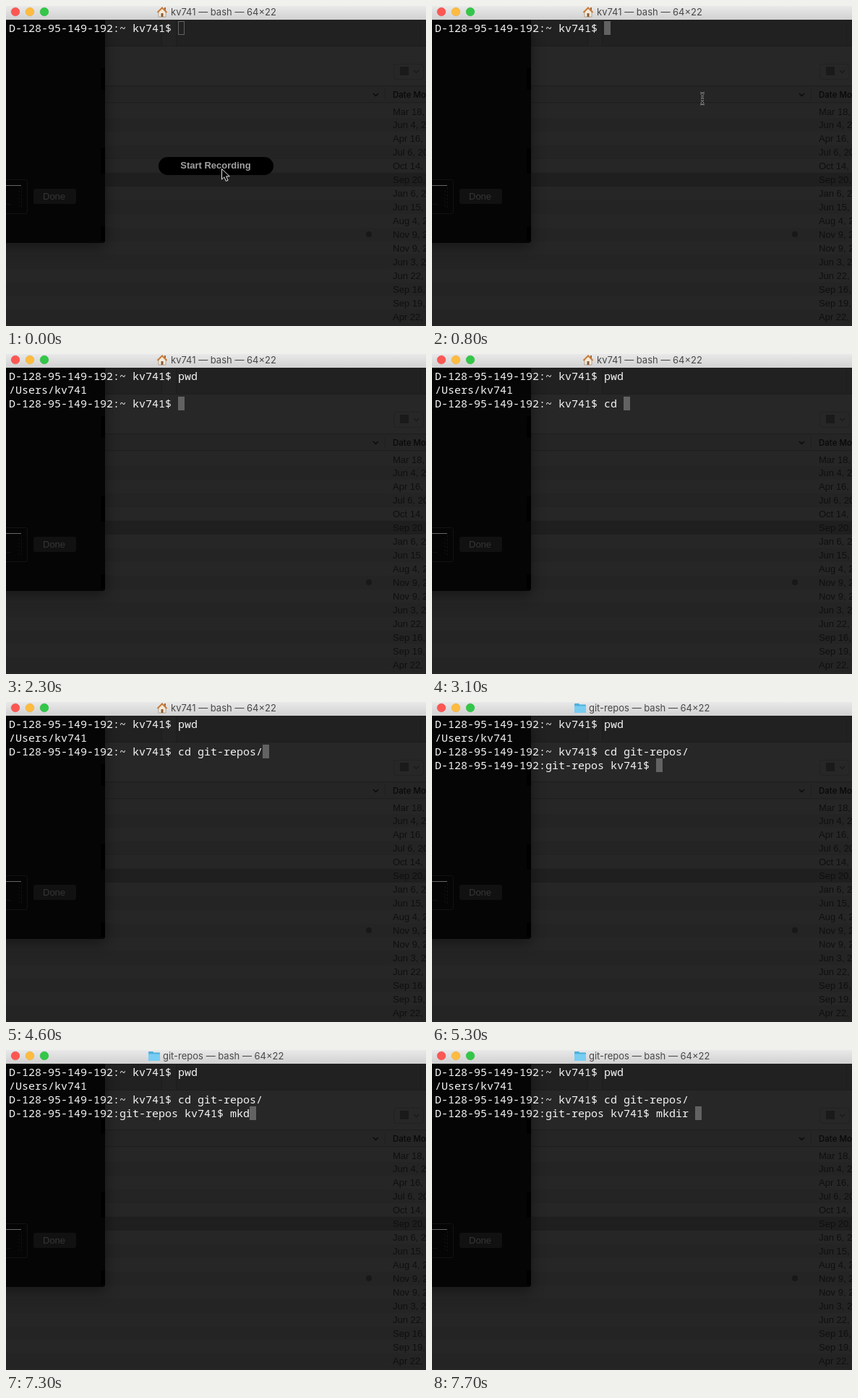
Recreate the animation shown at these times as an HTML page. Size 581 px wide and 443 px high, loop 8 s.

```html
<!DOCTYPE html>
<html lang="en">
<head>
<meta charset="utf-8">
<title>Terminal session</title>
<style>
html, body { margin: 0; width: 100%; height: 100%; overflow: hidden; background: #252525; }
#stage { position: absolute; left: 0; top: 0; width: 581px; height: 443px; overflow: hidden; }
svg { position: absolute; left: 0; top: 0; font-family: "Liberation Sans", sans-serif; }
.ui { font-family: Inter, sans-serif; }
#term {
  position: absolute; left: 4px; top: 21px; margin: 0;
  font: 300 15px/19px "Noto Sans Mono", monospace; color: #f4f4f4; white-space: pre;
}
#cursor { position: absolute; width: 9px; height: 19px; box-sizing: border-box; background: #626262; }
#cursor.hollow { background: none; border: 1px solid #626262; }
</style>
</head>
<body>
<div id="stage">
  <svg width="581" height="443">
    <defs>
      <linearGradient id="bar" x2="0" y2="1">
        <stop stop-color="#e9e9e9"/><stop offset="1" stop-color="#d1d1d1"/>
      </linearGradient>
      <filter id="soft" x="-40%" y="-40%" width="180%" height="180%">
        <feGaussianBlur stdDeviation="10"/>
      </filter>
    </defs>

    <!-- file window seen through the terminal -->
    <rect width="581" height="443" fill="#252525"/>
    <rect y="19" width="581" height="36" fill="#212121"/>
    <rect x="215" y="19" width="21" height="36" fill="#232323"/>
    <path d="M215.5 20V55M235.5 20V55M573.5 20V55M0 55.5H581" stroke="#1d1d1d"/>
    <rect y="56" width="581" height="54" fill="#272727"/>
    <path d="M0 110.5H581M0 133.5H581M524.5 115V129" stroke="#1e1e1e"/>
    <rect x="536.5" y="80.5" width="41" height="21" rx="4" fill="#272727" stroke="#212121"/>
    <rect x="545" y="84" width="12" height="12" fill="#1a1a1a"/>
    <path d="M564 89l3.5 3.5 3.5-3.5" fill="none" stroke="#1a1a1a" stroke-width="1.5"/>
    <path d="M508 121l3.5 3.5 3.5-3.5" fill="none" stroke="#0a0a0a" stroke-width="1.5"/>
    <text class="ui" x="535" y="126.5" font-size="11.5" font-weight="500" fill="#080808">Date Modified</text>
    <g id="rows" font-size="13"></g>
    <circle cx="502" cy="316" r="4" fill="#181818"/>

    <!-- dark panel on the left -->
    <rect x="-20" y="30" width="157" height="304" fill="#000" opacity=".4" filter="url(#soft)"/>
    <path d="M0 19H137V325Q137 328 134 328H0Z" fill="#050505"/>
    <path d="M134 86v30M134 197v35M134 305v20" stroke="#000" stroke-width="6"/>
    <path d="M0 240.5H27Q29.5 240.5 29.5 243V285Q29.5 287.5 27 287.5H0" fill="none" stroke="#121212"/>
    <path d="M0 248.5H21" stroke="#666"/>
    <path d="M21.5 251V281M18 255V279" stroke="#111" stroke-dasharray="3 2"/>
    <path d="M1 274.5H7" stroke="#121212"/>
    <rect x="38" y="253" width="59" height="21" rx="3" fill="#111"/>
    <text x="51" y="268" font-size="13" fill="#363636">Done</text>

    <!-- title bar -->
    <rect width="581" height="19" fill="url(#bar)"/>
    <g stroke-width=".6">
      <circle cx="13" cy="8" r="5.8" fill="#fc5753" stroke="#e9504c"/>
      <circle cx="33" cy="8" r="5.8" fill="#fdbc40" stroke="#e8a93a"/>
      <circle cx="53" cy="8" r="5.8" fill="#33c748" stroke="#2db53f"/>
    </g>
    <g id="home">
      <path d="M211 8V15H221V8L216 3Z" fill="#f3ead9" stroke="#a08a72" stroke-width=".7"/>
      <path d="M219 2h2v4h-2z" fill="#a9672f"/>
      <path d="M209.5 9L216 2.5 222.5 9" fill="none" stroke="#c67b3c" stroke-width="2"/>
      <path d="M214.5 10h3v5h-3z" fill="#8b5a35"/>
    </g>
    <g id="folder">
      <path d="M197 3Q197 2 198 2H203L204.5 3.5H212Q213 3.5 213 4.5V14Q213 15 212 15H198Q197 15 197 14Z" fill="#4fb1dc"/>
      <path d="M197 5.5H213V14Q213 15 212 15H198Q197 15 197 14Z" fill="#79cdf2"/>
    </g>
    <text id="title" class="ui" y="13" font-size="13" fill="#484848"></text>
  </svg>

  <div id="cursor"></div>
  <pre id="term"></pre>

  <svg width="581" height="443">
    <defs>
      <path id="beamShape" d="M371 120.5Q374 120.5 374 123V133Q374 136 371 136M377 120.5Q374 120.5 374 123M374 133Q374 136 377 136M372 129.5H376"/>
    </defs>
    <g id="record">
      <rect x="211" y="209" width="159" height="25" rx="12.5" fill="#000"/>
      <text x="290" y="225" text-anchor="middle" font-size="13" font-weight="bold" fill="#a2a2a2">Start Recording</text>
    </g>
    <path id="arrow" d="M0 0V14.5L3.4 11.3 5.8 17 8.6 15.8 6.2 10.3H10.8Z" fill="#080808" stroke="#e4e4e4"/>
    <g id="beam" fill="none">
      <use href="#beamShape" stroke="#a0a0a0" stroke-width="2.6"/>
      <use href="#beamShape" stroke="#111"/>
    </g>
  </svg>
</div>

<script>
const LOOP = 8000, CELL = 9, LINE = 19;
const USER = "kv741", HOST = "D-128-95-149-192:";
const $ = id => document.getElementById(id);

const dates = ["Mar 18", "Jun 4", "Apr 16", "Jul 6", "Oct 14", "Sep 20", "Jan 6", "Jun 15",
  "Aug 4", "Nov 9", "Nov 9", "Jun 3", "Jun 22", "Sep 16", "Sep 19", "Apr 22"];
$("rows").innerHTML = dates.map((date, i) => {
  const y = 136 + i * 18.97;
  const fill = i === 5 ? "#1f1f1f" : i % 2 ? "#242424" : "#262626";
  return `<rect y="${y}" width="581" height="19" fill="${fill}"/>
    <text x="535" y="${y + 14.5}" fill="#0f0f0f">${date}, 2014</text>`;
}).join("");

const show = (id, on) => { $(id).style.display = on ? "" : "none"; };
const typed = (text, times, t) => text.slice(0, times.filter(at => at <= t).length);
const prompt = dir => `${HOST}${dir} ${USER}$ `;

function terminalLines(t) {
  const lines = [prompt("~") + typed("pwd", [1500, 1600, 1800], t)];
  if (t >= 1900) {
    const cd = "cd git-repos/";
    // tab completion fills in the rest of the folder name
    const cmd = t >= 4600 ? cd : typed(cd, [2800, 2900, 3000, 4200, 4400, 4500], t);
    lines.push("/Users/" + USER, prompt("~") + cmd);
  }
  if (t >= 5300) {
    const typo = t >= 5900 && t < 6200 ? "n" : "";
    lines.push(prompt("git-repos") + typo + typed("mkdir ", [6400, 6600, 7300, 7400, 7500, 7700], t));
  }
  return lines;
}

function drawTerminal(t) {
  const lines = terminalLines(t), row = lines.length - 1;
  const cursor = $("cursor");
  $("term").textContent = lines.join("\n");
  cursor.style.left = 4 + lines[row].length * CELL + "px";
  cursor.style.top = 21 + row * LINE + "px";
  cursor.className = t < 800 ? "hollow" : "";
}

function drawTitle(t) {
  const inRepos = t >= 5300;
  show("home", !inRepos);
  show("folder", inRepos);
  $("title").setAttribute("x", inRepos ? 217 : 228);
  $("title").textContent = `${inRepos ? "git-repos" : USER} — bash — 64×22`;
}

function drawPointer(t) {
  const step = Math.min(Math.floor(t / 100), 4) / 4;
  const ease = step * step * (3 - 2 * step);
  $("arrow").setAttribute("transform", `translate(${298.5 + 74 * ease} ${225.5 - 103 * ease})`);
  $("record").style.opacity = 1 - step;
  show("arrow", t < 400);
  show("beam", t >= 400 && t < 1500);
}

const start = performance.now();
function run() {
  const t = (performance.now() - start) % LOOP;
  drawTerminal(t);
  drawTitle(t);
  drawPointer(t);
  requestAnimationFrame(run);
}
run();
</script>
</body>
</html>
```
